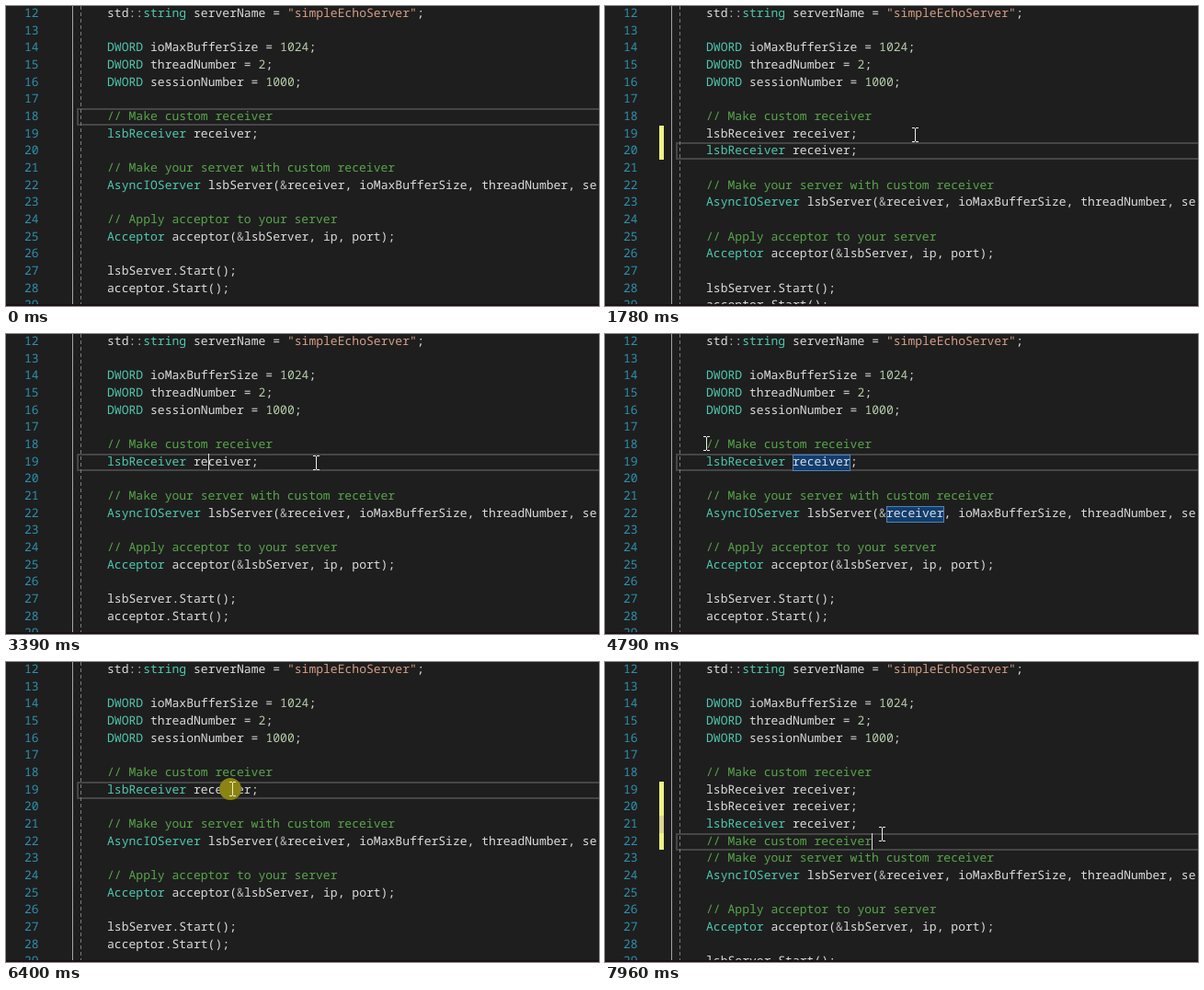
An HTML page with a canvas for the animation above (8000 ms loop, 645x326 px).

```html
<!DOCTYPE html>
<html lang="en">
<head>
<meta charset="utf-8">
<style>
  html, body { margin: 0; height: 100%; overflow: hidden; background: #1e1e1e; }
  canvas { display: block; }
</style>
</head>
<body>
<canvas id="stage" width="645" height="326"></canvas>
<script>
const ctx = document.getElementById('stage').getContext('2d');
const LOOP = 8000, FIRST_LINE = 12, CHAR = 7.836, LEFT = 110, BLINK = 525;
const COMMENT = '// Make custom receiver', RECEIVER = 'lsbReceiver receiver;';
const TOKENS = /(\/\/.*|".*"|\b(?:DWORD|string|lsbReceiver|AsyncIOServer|Acceptor)\b|\d+|&|::)/;

const HEAD = [
  'std::string serverName = "simpleEchoServer";', '',
  'DWORD ioMaxBufferSize = 1024;',
  'DWORD threadNumber = 2;',
  'DWORD sessionNumber = 1000;', '',
  COMMENT
];
const TAIL = [
  '// Make your server with custom receiver',
  'AsyncIOServer lsbServer(&receiver, ioMaxBufferSize, threadNumber, se', '',
  '// Apply acceptor to your server',
  'Acceptor acceptor(&lsbServer, ip, port);', '',
  'lsbServer.Start();',
  'acceptor.Start();', ''
];

// Each edit changes part of the editor state; a new column restarts the caret blink.
const EDITS = [
  { at: -830, line: 18, col: 23, copies: 0 },
  { at: 990, line: 19, col: 14 },
  { at: 1220, lit: true },
  { at: 1780, line: 20, copies: 1, lit: false },
  { at: 2060, line: 21, copies: 2 },
  { at: 3110, line: 20, copies: 1 },
  { at: 3390, line: 19, copies: 0 },
  { at: 3620, lit: true },
  { at: 4840, line: 18, col: 0, lit: false, selecting: true },
  { at: 5235, col: 23 },
  { at: 6390, line: 19, col: 17, selecting: false },
  { at: 6490, lit: true },
  { at: 6860, line: 20, copies: 1 },
  { at: 6910, lit: false },
  { at: 6990, line: 21, copies: 2 },
  { at: 7400, line: 22, col: 0 },
  { at: 7830, col: 23, pasted: true }
];
const MOVES = [
  { from: 220, to: 900, x: 222, y: 140 },
  { from: 1090, to: 1320, x: 337, y: 141 },
  { from: 3620, to: 4600, x: 110, y: 120 },
  { from: 4860, to: 5230, x: 337, y: 125 },
  { from: 5740, to: 6300, x: 246, y: 139 },
  { from: 6450, to: 6750, x: 314, y: 154 },
  { from: 7170, to: 7390, x: 301, y: 188 }
];
const PRESSES = [
  { from: 930, to: 1130 }, { from: 4840, to: 5560 },
  { from: 6350, to: 6530 }, { from: 7380, to: 7540 }
];

const clamp = (v, min, max) => Math.max(min, Math.min(max, v));
const rowTop = line => Math.round(111 + (line - 18) * 56 / 3);
const colX = col => LEFT + col * CHAR;

function mouseAt(t) {
  let x = 650, y = 291;
  for (const move of MOVES) {
    const u = clamp((t - move.from) / (move.to - move.from), 0, 1);
    const s = u * u * (3 - 2 * u);
    x += (move.x - x) * s;
    y += (move.y - y) * s;
  }
  return [Math.round(x), Math.round(y)];
}

function stateAt(t) {
  const past = EDITS.filter(edit => t >= edit.at);
  const state = Object.assign({}, ...past);
  const since = t - past.findLast(edit => 'col' in edit).at;
  state.caretOn = Math.floor(since / BLINK) % 2 === 0;
  if (state.selecting && !state.col) {
    state.col = clamp(Math.round((mouseAt(t)[0] - LEFT) / CHAR), 0, COMMENT.length);
  }
  return state;
}

function rect(color, x, y, w, h) {
  ctx.fillStyle = color;
  ctx.fillRect(x, y, w, h);
}

function frame(color, x, y, w, h, width) {
  ctx.strokeStyle = color;
  ctx.lineWidth = width;
  ctx.strokeRect(x, y, w, h);
}

function text(str, x, line, color) {
  ctx.fillStyle = color;
  ctx.fillText(str, x, rowTop(line) + 13);
}

function tokenColor(token, stale) {
  if (token.startsWith('//')) return '#57a64a';
  if (token.startsWith('"')) return '#d69d85';
  if (/^\d/.test(token)) return '#b5cea8';
  if (/^[&:]/.test(token)) return '#b4b4b4';
  return !stale && TOKENS.test(token) ? '#4ec9b0' : '#dcdcdc';
}

function drawCode(str, line, stale) {
  let col = 0;
  for (const token of str.split(TOKENS)) {
    if (token.trim()) text(token, colX(col), line, tokenColor(token, stale));
    col += token.length;
  }
}

function drawGutter() {
  rect('#a5a5a5', 72, 0, 1, 326);
  for (let y = 0; y < 326; y += 7) rect('#7c7c7c', 81, y, 1, 4);
}

function drawHighlight(col, line) {
  const x = Math.round(colX(col)), y = rowTop(line) + 1;
  rect('#113d6f', x, y, 63, 18);
  frame('#5382b0', x + .5, y + .5, 62, 17, 1);
}

function drawMouse(t) {
  const [x, y] = mouseAt(t);
  const press = PRESSES.find(({ from, to }) => t >= from && t < to);
  if (press) {
    ctx.globalAlpha = Math.min(1, (press.to - t) / 80);
    ctx.fillStyle = '#8b8414';
    ctx.beginPath();
    ctx.arc(x - 2, y - 1, 12, 0, 7);
    ctx.fill();
    ctx.globalAlpha = 1;
  }
  const color = press ? '#f4f0b4' : '#f0f0f0';
  rect(color, x, y - 8, 1, 14);
  for (const end of [y - 9, y + 6]) {
    rect(color, x - 3, end, 3, 1);
    rect(color, x + 1, end, 3, 1);
  }
}

function draw(t) {
  const { line, col, copies, lit, selecting, pasted, caretOn } = stateAt(t);
  const lines = [...HEAD, ...Array(copies + 1).fill(RECEIVER), pasted ? COMMENT : '', ...TAIL];
  const lastReceiver = 19 + copies;
  const selected = selecting ? col : 0;

  rect('#1e1e1e', 0, 0, 645, 326);
  if (!selected) frame('#464646', 78, rowTop(line) + 1, 580, 17, 2);
  drawGutter();
  if (copies) {
    const end = rowTop(lastReceiver + (pasted ? 2 : 1));
    rect('#eff284', 59, rowTop(19), 5, end - rowTop(19));
    if (pasted) rect('#d9d590', 59, rowTop(21), 5, 19);
  }
  if (selected) rect('#264f78', LEFT, rowTop(18), selected * CHAR, 19);
  if (lit) {
    drawHighlight(12, lastReceiver);
    drawHighlight(25, lastReceiver + 3);
  }

  ctx.font = '500 13.06px "Noto Sans Mono", "DejaVu Sans Mono", monospace';
  ctx.textRendering = 'geometricPrecision';
  lines.slice(0, 18).forEach((str, i) => {
    const number = FIRST_LINE + i;
    text(String(number), 20, number, '#2b91af');
    drawCode(str, number, str === RECEIVER && number < lastReceiver);
  });

  if (caretOn) rect('#dcdcdc', Math.round(colX(col)), rowTop(line), 1, 18);
  rect('#1a1118', 0, 324, 645, 2);
  drawMouse(t);
}

function tick() {
  draw(performance.now() % LOOP);
  requestAnimationFrame(tick);
}
tick();
</script>
</body>
</html>
```
